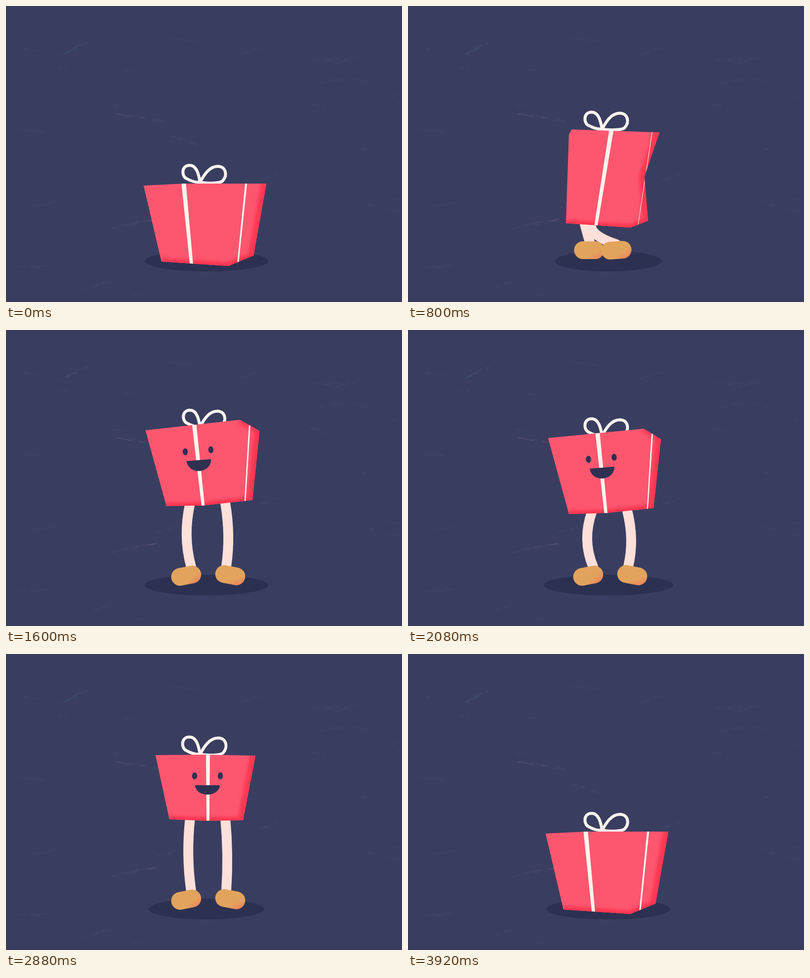
Animation of 800x600 px, one loop 4.04 s. Source, as an HTML page:

```html
<!DOCTYPE html>
<html lang="en">
<head>
<meta charset="utf-8">
<title>Walking gift box</title>
<style>
html, body { margin: 0; width: 100%; height: 100%; overflow: hidden; background: #393e60; }
svg { display: block; width: 100vw; height: 100vh; }
</style>
</head>
<body>
<svg viewBox="0 0 800 600">
  <defs>
    <clipPath id="inside"><path id="clip"/></clipPath>
    <filter id="soft" filterUnits="userSpaceOnUse" x="0" y="0" width="800" height="600"><feGaussianBlur stdDeviation="3"/></filter>
    <linearGradient id="leather" x1="0" y1="0" x2="1" y2="1">
      <stop offset=".66" stop-color="#e2a45c"/><stop offset="1" stop-color="#f2795c"/>
    </linearGradient>
  </defs>
  <rect width="800" height="600" fill="#393e60"/>
  <g id="grain" fill="none" stroke-linecap="round"/>
  <ellipse id="shadow" cx="405" cy="517" ry="21" fill="#2d3151"/>
  <g id="legs" fill="none" stroke="#fde0da" stroke-width="20" stroke-linecap="round">
    <path id="legL"/><path id="legR"/>
  </g>
  <g id="bow" fill="none" stroke="#fff4ef" stroke-width="6" stroke-linejoin="round">
    <path vector-effect="non-scaling-stroke" d="M0 0C-2-10-5-34-21-34C-38-34-38-12-27-7C-18-2-8 1 0 0"/>
    <path vector-effect="non-scaling-stroke" d="M0 0C8-14 18-32 36-32C52-32 56-14 46-3C42 3 12 3 0 0"/>
  </g>
  <path id="box" fill="#fd5770"/>
  <g clip-path="url(#inside)">
    <g fill="none" stroke="#fd3550" filter="url(#soft)">
      <path id="low" stroke-width="14"/>
      <path id="side" stroke-width="22" opacity=".9"/>
      <path id="rim" stroke-width="14"/>
    </g>
    <path id="band" fill="#fff4ec"/><path id="band2" fill="#fff4ec"/>
  </g>
  <g id="face" fill="#2e3152">
    <ellipse cx="-26" rx="5.2" ry="7"/><ellipse cx="26" rx="5.2" ry="7"/>
    <path id="mouth"/>
  </g>
  <g id="shoes" fill="url(#leather)">
    <rect id="shoeL" x="-30.5" y="-18" width="61" height="36" rx="18"/>
    <rect id="shoeR" x="-30.5" y="-18" width="61" height="36" rx="18"/>
  </g>
</svg>
<script>
const el = {};
document.querySelectorAll('[id]').forEach(e => el[e.id] = e);
const set = (id, name, v) => el[id].setAttribute(name, v);
const show = (id, on) => set(id, 'visibility', on ? 'visible' : 'hidden');
const LOOP = 4040, STEP = 80;

const part = (t, a, b) => Math.min(1, Math.max(0, (t - a) / (b - a)));
const ease = (t, a, b) => { const p = part(t, a, b); return p * p * (3 - 2 * p); };
const pulse = (t, a, b) => Math.sin(Math.PI * part(t, a, b));
const points = text => text.split(' ').map(p => p.split(',').map(Number));
const line = pts => 'M' + pts.map(p => p.join(' ')).join('L');

// Blends numbers, arrays and objects alike.
function mix(a, b, p) {
  if (typeof a === 'number') return a + (b - a) * p;
  if (Array.isArray(a)) return a.map((v, i) => mix(v, b[i], p));
  return Object.fromEntries(Object.keys(a).map(k => [k, mix(a[k], b[k], p)]));
}

// Corners run anticlockwise from top left. Bands: x at top, x at bottom, width. Bow: y, size. Face: x, y, tilt.
const crate = { base: 518, corners: points('278,364 314,518 449,527 500,506 526,360 360,360'), pinch: 0,
  band: [359, 375, 9], band2: [485, 468, 4], bow: [357, 1], face: [411, 419, -3], rim: 0, shadow: 125 };
const twist = { base: 445, corners: points('325,260 319,440 449,449 485,435 508,256 331,250'), pinch: 19,
  band: [411, 379, 9], band2: [494, 464, 1.2], bow: [249, 1], face: [457, 300, 0], rim: 0, shadow: 108 };
const leap = { base: 286, corners: points('275,136 318,286 387,290 508,274 519,135 452,102'), pinch: 0,
  band: [364, 389, 8], band2: [487, 479, 4], bow: [114, .83], face: [374.5, 179.5, -5], rim: 1, shadow: 93 };
const stand = { base: 371, corners: points('283,219 325,373 400,371 496,361 511,221 476,200'), pinch: 0,
  band: [382, 400, 9], band2: [494, 483, 3], bow: [214, 1], face: [390.5, 260, -4.5], rim: .8, shadow: 131 };
const front = { base: 336, corners: points('302,205 330,335 405,338 479,337 504,206 403,204'), pinch: 0,
  band: [408, 408, 8], band2: [510, 490, 0], bow: [203, 1.02], face: [407, 247, 0], rim: 0, shadow: 117 };

const cues = [[720, 800, twist], [800, 1040, leap], [1360, 1680, stand], [2480, 2640, front], [3040, 3200, crate]];
const poseAt = t => cues.reduce((pose, [a, b, next]) => mix(pose, next, ease(t, a, b)), crate);

// Each leg: hip x, bend, foot x, foot y, foot angle, ankle offset.
const turned = [[357, 0, 366, 495, 0, 2, -14], [370, -.22, 421, 495, -4, 0, -12]];
const wide = [[372, -.36, 364, 498, -11, 10, -18], [443, .22, 453, 497, 11, -8, -18]];
const airborne = y => [[357, -.21, 350, y + 37, 3, -24, 0], [455, .05, 463, y, -55, 0, 0]];

// Height of the box bottom: rest, jump, springy landing, turn with a hop, fall.
function level(t) {
  if (t < 800) return crate.base;
  if (t < 1280) return 201 + (t < 1040 ? .00424 : .00332) * (t - 1040) ** 2;
  const u = t - 1280;
  const spring = 95 * Math.exp(-u / 200) * Math.sin(2 * Math.PI * (u + 30) / 415);
  const still = mix(stand.base, front.base, ease(t, 2480, 2640)) + (t < 2480 ? spring : 0);
  const hop = 30 * pulse(t, 2440, 2640) - 24 * pulse(t, 2640, 2880) - 36 * pulse(t, 2880, 3200);
  return mix(still + hop, crate.base, part(t, 3040, 3200) ** 2);
}

function ribbon([top, bottom, w], place, y1, y2) {
  const [x1] = place([top, 0]), [x2] = place([bottom, 0]);
  return line([[x1 - w / 2, y1], [x1 + w / 2, y1], [x2 + w * .36, y2], [x2 - w * .36, y2]]) + 'Z';
}

function limb(side, [hip, bend, fx, fy, angle, ax, ay], base) {
  const x = fx + ax, y = fy + ay;
  const slack = Math.max(0, 170 - (fy - 18 - base));
  const bow = Math.max(-45, Math.min(45, slack * bend));
  set('leg' + side, 'd', `M${hip} ${base - 4}Q${(hip + x) / 2 + bow} ${(base + y) / 2} ${x} ${y}`);
  set('shoe' + side, 'transform', `translate(${fx} ${fy}) rotate(${angle})`);
}

function draw(t) {
  const pose = poseAt(t), base = level(t);
  const squash = .17 * pulse(t, 160, 720) + .09 * pulse(t, 1280, 1600) +
    .07 * pulse(t, 2480, 2640) - .05 * pulse(t, 2640, 2880);
  const u = t - 3200, ring = u < 0 ? 0 : Math.exp(-u / 200);
  const sx = 1 + .7 * squash, sy = 1 - squash - .12 * ring * ring;
  const place = ([x, y]) => [405 + (x - 405) * sx, base + (y - pose.base) * sy];

  const pts = pose.corners.map(place), [, , mid, br, tr, tm] = pts;
  const waist = [(br[0] + tr[0]) / 2 - pose.pinch, (br[1] + tr[1]) / 2];
  pts.splice(4, 0, waist);
  const outline = line(pts) + 'Z';
  set('box', 'd', outline);
  set('clip', 'd', outline);
  set('low', 'd', line([pts[1], mid, br]));
  set('side', 'd', line([br, waist, tr]));
  set('rim', 'd', line([tr, tm]));
  set('rim', 'opacity', pose.rim);
  const ys = pts.map(p => p[1]), top = Math.min(...ys), bottom = Math.max(...ys);
  set('band', 'd', ribbon(pose.band, place, top, bottom));
  set('band2', 'd', ribbon(pose.band2, place, top, bottom));

  const swing = 2 * Math.PI * u / 320, sway = ring * Math.sin(swing);
  const [kx, ky] = place([392, pose.bow[0]]), size = pose.bow[1];
  set('bow', 'transform', `translate(${kx + 5 * sway} ${ky}) ` +
    `scale(${size * (1 + .1 * sway)} ${size * (1 + .15 * ring * Math.cos(swing))})`);
  set('shadow', 'rx', pose.shadow + 90 * squash);

  const drop = 4 / 3 * (6 + 16 * ease(t, 1360, 1520) - 3 * ease(t, 2480, 2640));
  set('face', 'transform', `translate(${place(pose.face)}) rotate(${pose.face[2]})`);
  set('mouth', 'd', `M-25 19C-23 ${19 + drop} 23 ${19 + drop} 25 19Z`);
  show('face', t >= 960 && t < 3120);

  const lift = ease(t, 800, 960) - ease(t, 1200, 1280) + ease(t, 3040, 3200);
  const legs = mix(t < 1040 ? turned : wide, airborne(base), lift);
  limb('L', legs[0], base);
  limb('R', legs[1], base);
  show('legs', t >= 800 && t < 3200);
  show('shoes', t >= 800 && t < 3200);
}

let seed = 11;
const rnd = () => (seed = seed * 16807 % 2147483647) / 2147483647;

// A paper crease: a bundle of thin scratches along one line.
function crease(x, y, dx, dy, color, alpha) {
  let d = '';
  for (let i = 0; i < 16; i++) {
    const p = rnd() * .85, q = p + .06 + rnd() * .09, j = (rnd() - .5) * 7 * Math.sin(p * 3.1);
    d += `M${x + dx * p} ${y + dy * p + j}L${x + dx * q} ${y + dy * q + j}`;
  }
  return `<path d="${d}" stroke="${color}" stroke-width=".9" opacity="${alpha}"/>`;
}
const WARM = '#8b7088', COOL = '#587ba0';
let grain = crease(220, 218, 110, 18, WARM, .24) + crease(207, 452, 100, -20, WARM, .24) +
  crease(105, 102, 70, -33, COOL, .24) + crease(320, 260, 75, 23, COOL, .16);
for (let i = 0; i < 26; i++) {
  const dx = 25 + rnd() * 55;
  grain += crease(rnd() * 780, rnd() * 590, dx, dx * (rnd() - .5) * .8, COOL, .09);
}
el.grain.innerHTML = grain;

const start = performance.now();
function tick() {
  const t = (performance.now() - start) % LOOP;
  draw(Math.min(3920, Math.floor(t / STEP) * STEP));
  requestAnimationFrame(tick);
}
tick();
</script>
</body>
</html>
```
